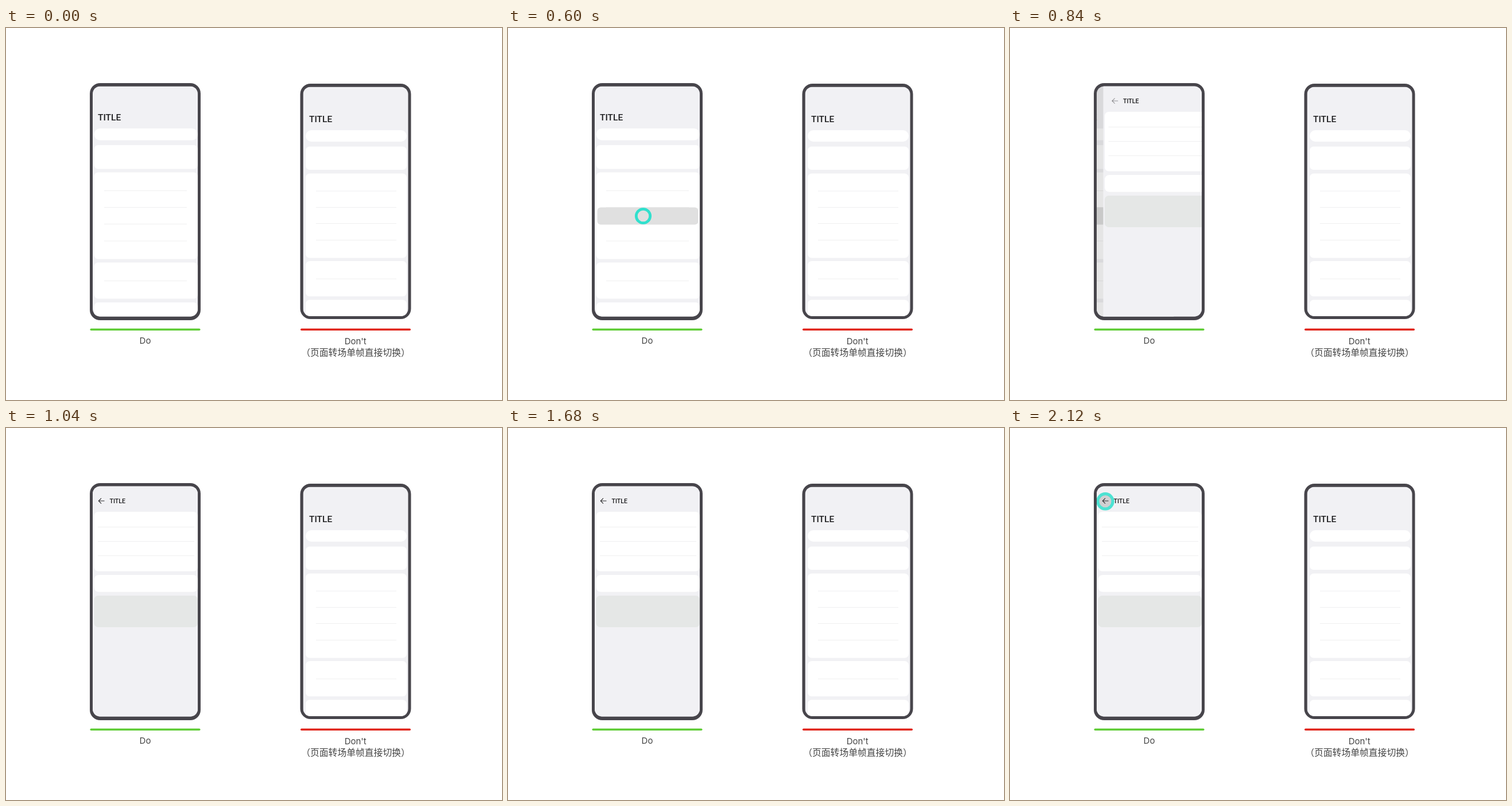
These frames come from a looping animation (864x648 px, 2.16 s). An HTML page with a canvas:

```html
<!DOCTYPE html>
<html lang="zh-CN">
<head>
<meta charset="utf-8">
<title>Page transition</title>
<style>
  html, body { margin: 0; width: 100%; height: 100%; overflow: hidden; background: #fff; }
  canvas { display: block; width: 864px; height: 648px; }
</style>
</head>
<body>
<canvas id="stage" width="864" height="648"></canvas>
<script>
const ctx = document.getElementById('stage').getContext('2d');
const LOOP = 2160, TICK = 40;
const LATIN = 'Roboto, Arial, sans-serif';
const LABEL = 'Inter, Arial, sans-serif';
const HAN = '"Noto Sans CJK SC", "Noto Sans CJK", sans-serif';
const BEZEL = '#47454b', PAGE = '#f1f1f4', PRESS = '#e0e0e0';

const phones = {
  left: { outer: [146, 96, 339, 509], inner: [151, 101.5, 334, 502.5] },
  right: { outer: [512.5, 97, 705.5, 507], inner: [517.5, 102.5, 700.5, 502] }
};

const lists = {
  left: {
    title: [160, 160.5], x: [153.5, 334], rule: [171, 315],
    cards: [[175, 195.5, 10], [204, 245.5, 7], [251.5, 402.5, 7], [408.5, 471.5, 7], [478, 515, 7]],
    rules: [283.5, 312.5, 341.5, 371, 440.5]
  },
  right: {
    title: [528, 163.7], x: [522, 698], rule: [540, 680],
    cards: [[178, 198, 10], [206.5, 247, 7], [253.5, 400.5, 7], [406, 467.5, 7], [473.5, 515, 7]],
    rules: [284, 312.5, 340.5, 369.5, 437]
  }
};

// Progress of t between a and b, held to 0..1.
const ramp = (t, a, b) => Math.min(1, Math.max(0, (t - a) / (b - a)));
const easeOut = p => 1 - (1 - p) ** 4;

function box(x0, y0, x1, y1, r, fill) {
  ctx.fillStyle = fill;
  ctx.beginPath();
  ctx.roundRect(x0, y0, x1 - x0, y1 - y0, r);
  ctx.fill();
}

function stroke(points, color, width) {
  ctx.strokeStyle = color;
  ctx.lineWidth = width;
  ctx.beginPath();
  points.forEach(([x, y]) => ctx.lineTo(x, y));
  ctx.stroke();
}

function text(s, x, y, font, color, align = 'left') {
  ctx.font = font;
  ctx.fillStyle = color;
  ctx.textAlign = align;
  ctx.fillText(s, x, y);
}

function faded(alpha, draw) {
  if (alpha <= 0) return;
  ctx.save();
  ctx.globalAlpha *= alpha;
  draw();
  ctx.restore();
}

function shifted(dx, draw) {
  ctx.save();
  ctx.translate(dx, 0);
  draw();
  ctx.restore();
}

function phone({ outer, inner }, content) {
  box(...outer, 18, BEZEL);
  ctx.save();
  ctx.beginPath();
  ctx.roundRect(inner[0], inner[1], inner[2] - inner[0], inner[3] - inner[1], 13);
  ctx.clip();
  ctx.fillStyle = PAGE;
  ctx.fillRect(inner[0], inner[1], 190, 410);
  content();
  ctx.restore();
}

function listPage({ title, x, rule, cards, rules }) {
  text('TITLE', ...title, '500 15.5px ' + LATIN, '#1c1c1e');
  cards.forEach(([y0, y1, r]) => box(x[0], y0, x[1], y1, r, '#fff'));
  rules.forEach(y => stroke([[rule[0], y], [rule[1], y]], '#efeff0', 1));
}

function detailPage(off, t) {
  shifted(off, () => {
    ctx.fillStyle = PAGE;
    ctx.fillRect(151, 100, 190, 410);
    box(153.5, 146, 334, 249.5, 7, '#fff');
    box(153.5, 256, 334, 285.5, 8, '#fff');
    box(153.5, 292, 334, 347, 7, '#e5e7e6');
    [172.5, 197.5, 222.5].forEach(y => stroke([[160, y], [328, y]], '#efeff0', 1));
  });
  // The header trails the page a little.
  shifted(off * 1.45, () => {
    faded(ramp(t, 1940, 2080), () => {
      ctx.fillStyle = '#d0d0d2';
      ctx.beginPath();
      ctx.arc(166, 127.5, 11, 0, Math.PI * 2);
      ctx.fill();
    });
    faded(ramp(t, 720, 980), () => {
      stroke([[171.5, 127], [161.3, 127]], '#2a2a2c', 1.1);
      stroke([[166, 122.3], [161.3, 127], [166, 131.7]], '#2a2a2c', 1.1);
    });
    text('TITLE', 180.5, 131.2, '500 10.6px ' + LATIN, '#1c1c1e');
  });
}

// A touch ring that shrinks while it becomes opaque.
function ring(x, y, p, alpha) {
  const s = 1.5 - 0.5 * p;
  faded(p * alpha, () => {
    ctx.strokeStyle = '#31e0cd';
    ctx.lineWidth = 4.8 * s;
    ctx.beginPath();
    ctx.arc(x, y, 12.2 * s, 0, Math.PI * 2);
    ctx.stroke();
  });
}

function doScreen(t) {
  const slide = easeOut(ramp(t, 640, 1040));
  if (slide < 1) {
    shifted(-52 * slide, () => {
      listPage(lists.left);
      faded(ramp(t, 420, 560), () => box(155.5, 312.5, 331.5, 342.5, 6, PRESS));
    });
    faded(0.11 * slide, () => {
      ctx.fillStyle = '#000';
      ctx.fillRect(151, 100, 190, 410);
    });
  }
  if (slide > 0) detailPage(183 * (1 - slide), t);
  ring(235.5, 327.5, ramp(t, 220, 500), 1 - ramp(t, 640, 740));
  ring(166, 127.8, ramp(t, 1882, 2162), 1);
}

function caption(x0, x1, color) {
  box(x0, 523.4, x1, 526.9, 1.75, color);
}

function draw(t) {
  ctx.fillStyle = '#fff';
  ctx.fillRect(0, 0, 864, 648);
  phone(phones.left, () => doScreen(t));
  phone(phones.right, () => listPage(lists.right));
  caption(146.5, 338.5, '#5fcc35');
  caption(513, 705, '#e0251b');
  text('Do', 242.5, 550, '15px ' + LABEL, '#444', 'center');
  text("Don't", 608.7, 551, '15px ' + LABEL, '#444', 'center');
  text('（页面转场单帧直接切换）', 609, 570.5, '300 15.8px ' + HAN, '#444', 'center');
}

let start;
function frame(now) {
  start ??= now;
  const t = (now - start) % LOOP;
  draw(Math.floor(t / TICK) * TICK);
  requestAnimationFrame(frame);
}
requestAnimationFrame(frame);
</script>
</body>
</html>
```
